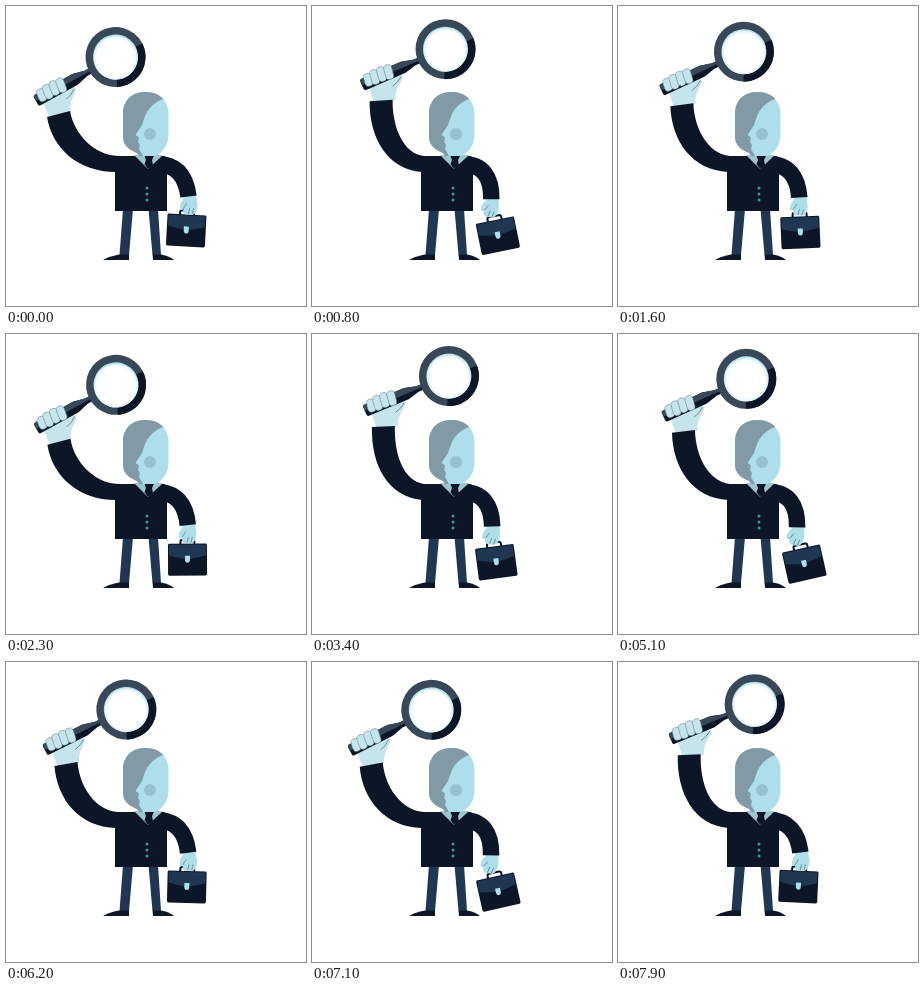
Recreate the animation shown at these times as an HTML page. Size 300 by 300 pixels, loop 8 s.

```html
<!DOCTYPE html>
<html lang="en">
<head>
<meta charset="utf-8">
<title>Man with magnifier</title>
<style>
  html, body { margin: 0; width: 100%; height: 100%; overflow: hidden; background: #fff; }
  svg { display: block; width: 100%; height: 100%; }
  .ink { fill: #0c1626; }
  .slate { fill: #394858; }
  .skin { fill: #aedeea; }
  .pale { fill: #c6e4ec; }
  .blue { fill: #203754; }
  .line { fill: none; stroke: #64808d; stroke-width: .8; stroke-linecap: round; }
</style>
</head>
<body>
<svg viewBox="0 0 300 300">
  <defs>
    <radialGradient id="glass">
      <stop offset=".85" stop-color="#fff"/>
      <stop offset="1" stop-color="#dff3f7"/>
    </radialGradient>
    <clipPath id="skull">
      <path id="headShape" d="M117 108C117 94 126 86 139.500 86S162.500 94 162.500 108V128C162.500 139 157 147 149 150H133L131 147C123 144 117 139 117 131Z"/>
    </clipPath>
  </defs>

  <!-- legs and shoes -->
  <path class="blue" d="M117 203H127L123 249H113.500ZM142.500 203H152L155 249H146.500Z"/>
  <path class="ink" d="M113 248.500H123V254H97Q104 250 113 248.500ZM146.500 248.500H155Q164 250 168 254H147Z"/>

  <!-- briefcase -->
  <g id="bag">
    <path d="M-7 -15V-18Q-7 -20 -5 -20H5Q7 -20 7 -18V-15" fill="none" stroke="#0c1626" stroke-width="2"/>
    <path class="ink" d="M-18.500 -16H18.500Q19.500 -16 19.500 -14V14Q19.500 16 18 16H-18Q-19.500 16 -19.500 14V-14Q-19.500 -16 -18.500 -16Z"/>
    <path class="blue" d="M-18.500 -15H18.500V-4Q10 -2 4 -1H-4Q-10 -2 -18.500 -4Z"/>
    <path class="skin" d="M-2.500 -4H2.500V0Q2.500 3 0 3T-2.500 0Z"/>
  </g>

  <!-- lower hand -->
  <g id="hand">
    <path class="skin" d="M-7 -3H7L9 8Q9 16 5 18H-3Q-6 16 -5 12Q-7 15 -8.500 12Q-9 7 -5 2Z"/>
    <path class="line" d="M-5 12L-2 7M0 17L1 12M4 17L5 12"/>
  </g>
  <path id="armR" fill="none" stroke="#0c1626" stroke-width="16.500"/>

  <!-- magnifier with the gripping hand -->
  <g id="lens">
    <path class="pale" d="M-85 0L-87 22L-66 27C-63 18 -57 15 -51 10Q-49 7 -53 3Z"/>
    <path class="line" d="M-63 13Q-57 12 -52 8"/>
    <path class="ink" d="M-89 -6H-46L-34 -3H-28V3H-34L-46 6H-89Q-91 6 -91 4V-4Q-91 -6 -89 -6Z"/>
    <path class="slate" d="M-89 -6H-46L-34 -3H-28V0H-91V-4Q-91 -6 -89 -6Z"/>
    <circle class="slate" r="30"/>
    <path class="ink" d="M0 0L30 1A30 30 0 0 1 -13 27Z"/>
    <circle r="22.500" fill="#b9e2ea"/>
    <circle cx="-.4" cy=".8" r="21.800" fill="url(#glass)"/>
    <g id="fingers" class="pale" stroke="#64808d" stroke-width=".5"></g>
  </g>
  <path id="armL" class="ink"/>

  <!-- torso -->
  <path class="ink" d="M109 150H158Q161 151 161 156V205H109Z"/>
  <path d="M128 149H157L142 163Z" fill="#9fc6cf"/>
  <path class="ink" d="M138.500 150H148L146 154L147 159L142 163L138.500 158L140 154Z"/>
  <g fill="#3c9a9e">
    <circle cx="141" cy="182" r="1.500"/>
    <circle cx="141" cy="188" r="1.500"/>
    <circle cx="141" cy="194" r="1.500"/>
  </g>

  <!-- head -->
  <use href="#headShape" class="skin"/>
  <path clip-path="url(#skull)" fill="#819aa5" d="M110 80H150L159 92C148 96 141 103 138 113L136 119L129.500 129L133 131.500L132 136L134 139L133 143L137 150H110Z"/>
  <circle cx="144" cy="128" r="6" fill="#96c2cf"/>
</svg>

<script>
  const $ = id => document.getElementById(id);
  const LOOP = 8000, STEP = 100;
  const mix = (a, b, p) => a + (b - a) * p;
  const wave = x => (1 - Math.cos(Math.PI * x)) / 2;

  // Raised arm outline: cuff, outer curve, shoulder, inner curve
  const armLow  = [41, 111, 46, 142, 72, 166, 110, 166, 112, 150, 88, 149, 68, 128, 64, 105];
  const armHigh = [60, 93, 59, 131, 76, 163, 110, 166, 112, 150, 91, 147, 82, 119, 83, 92];

  $('fingers').innerHTML = [-83.5, -76.5, -69, -61.5].map((x, i) =>
    `<rect x="${x - 4}" y="${-9 - (i === 1 || i === 2)}" width="8" height="${i ? 15 : 13}" rx="3.8" transform="rotate(8 ${x} 0)"/>`
  ).join('');

  // Lift of the magnifier: eased both ways with a short rest at the top
  function lift(t) {
    const period = 2230, half = 1075;
    const u = (t + 26) % period;
    return wave(Math.min(1, Math.min(u, period - u) / half));
  }

  const swing = t => wave(t / 1000);

  function pose(el, x, y, angle) {
    el.setAttribute('transform', `translate(${x} ${y}) rotate(${angle})`);
  }

  function draw(t) {
    const p = lift(t), q = swing(t);

    pose($('lens'), mix(109.5, 137, p), mix(51, 42, p), mix(-29, -22.5, p));
    const a = armLow.map((v, i) => mix(v, armHigh[i], p));
    $('armL').setAttribute('d',
      `M${a.slice(0, 2)}C${a.slice(2, 8)}L${a.slice(8, 10)}C${a.slice(10)}Z`);

    const x = mix(182.5, 179, q), y = mix(190.5, 193.5, q);
    pose($('bag'), mix(180.2, 186.5, q), mix(224.5, 230.3, q), mix(3, -13, q));
    pose($('hand'), x, y, 12 * q);
    $('armR').setAttribute('d',
      `M150 158C171 158 ${mix(180, 179.5, q)} 171 ${x} ${y}`);
  }

  const start = performance.now();
  function tick(now) {
    const t = Math.max(0, now - start) % LOOP;
    draw(Math.floor(t / STEP) * STEP);
    requestAnimationFrame(tick);
  }
  draw(0);
  requestAnimationFrame(tick);
</script>
</body>
</html>
```
